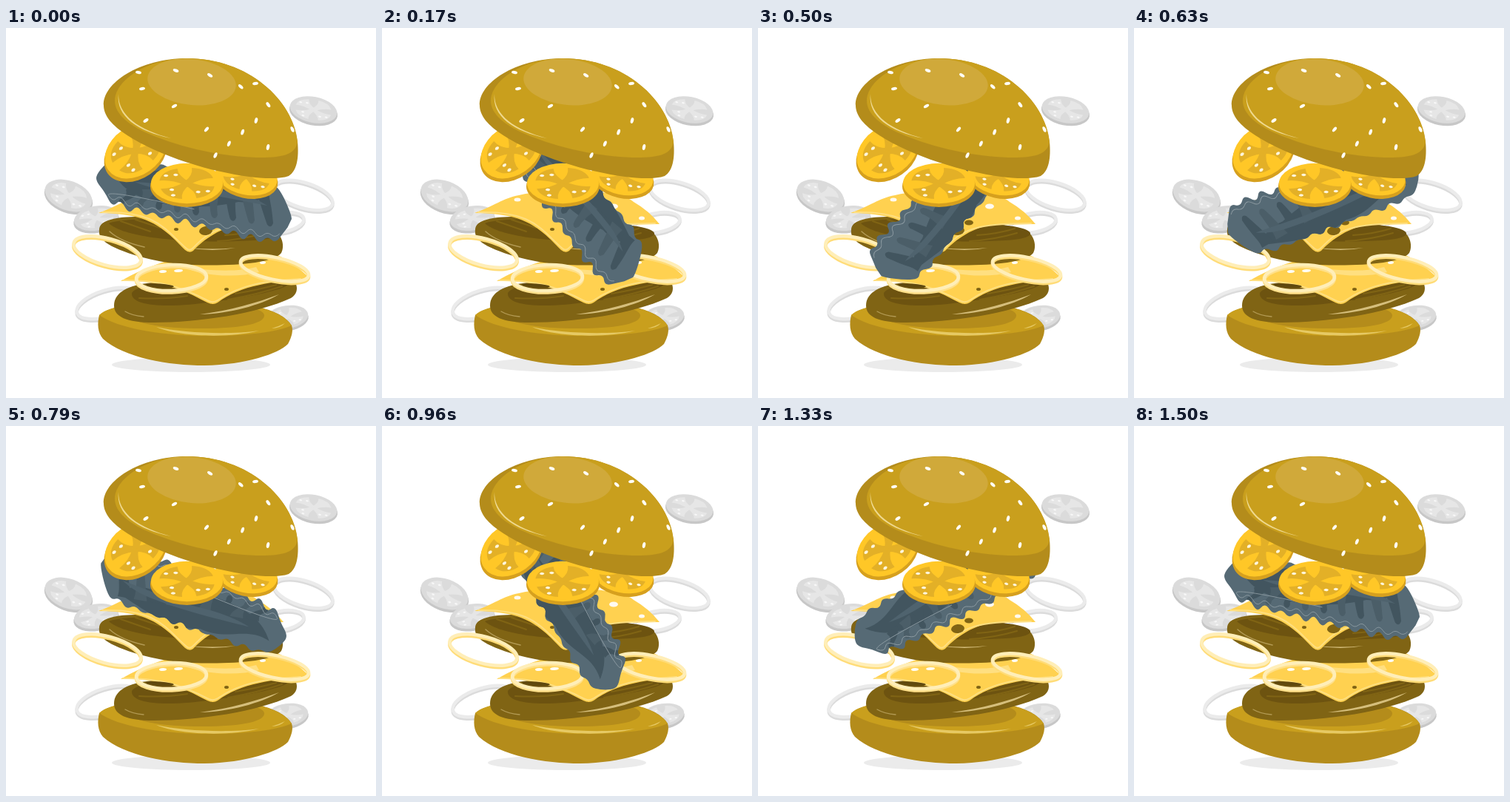
An HTML page with a canvas for the animation above (1.54 s loop, 500 by 500 pixels).

```html
<!DOCTYPE html>
<html lang="en">
<head>
<meta charset="utf-8">
<title>Burger</title>
<style>
  html, body { margin: 0; width: 100%; height: 100%; overflow: hidden; background: #fff; }
  canvas { display: block; width: 100vmin; height: 100vmin; }
</style>
</head>
<body>
<canvas id="stage" width="500" height="500"></canvas>
<script>
const ctx = document.getElementById('stage').getContext('2d');
const LOOP = 1540, STEPS = 37, STEP_ANGLE = 10;
const rad = deg => deg * Math.PI / 180;
const mix = (a, b, t) => a + (b - a) * t;

function fill(path, color) {
  ctx.fillStyle = color;
  ctx.fill(new Path2D(path));
}

function line(path, color, width) {
  ctx.strokeStyle = color;
  ctx.lineWidth = width;
  ctx.lineCap = ctx.lineJoin = 'round';
  ctx.stroke(new Path2D(path));
}

function oval(x, y, rx, ry, rot, color) {
  ctx.fillStyle = color;
  ctx.beginPath();
  ctx.ellipse(x, y, rx, ry, rad(rot), 0, 2 * Math.PI);
  ctx.fill();
}

function ring(x, y, rx, ry, rot, top, under) {
  ctx.lineWidth = 4.5;
  for (const [dy, color] of [[1.5, under], [-1, top]]) {
    ctx.strokeStyle = color;
    ctx.beginPath();
    ctx.ellipse(x, y + dy, rx, ry, rad(rot), 0, 2 * Math.PI);
    ctx.stroke();
  }
}

const GREY = { rim: '#c7c7c7', face: '#dbdbdb', cross: '#e6e6e6', seed: '#f7f7f7' };
const GOLD = { rim: '#d6a01e', face: '#ffc727', cross: '#e3b027', seed: '#fff6dc' };

function tomato(x, y, rx, ry, rot, skin, depth) {
  oval(x, y + depth / 2, rx, ry, rot, skin.rim);
  ctx.save();
  ctx.translate(x, y - depth / 2);
  ctx.rotate(rad(rot));
  ctx.scale(rx, ry);
  oval(0, 0, 0.98, 0.97, 0, skin.face);
  for (let i = 0; i < 4; i++) {
    ctx.save();
    ctx.rotate(rad(40 + i * 90));
    fill('M0-.1 Q.42-.12 .66-.38 Q.92 0 .66 .38 Q.42 .12 0 .1Z', skin.cross);
    oval(0.12, -0.5, 0.06, 0.06, 0, skin.seed);
    oval(-0.08, -0.68, 0.06, 0.06, 0, skin.seed);
    ctx.restore();
  }
  ctx.restore();
}

function background() {
  oval(250, 455, 107, 10, 0, '#ebebeb');
  tomato(415.5, 112, 33, 18, 11, GREY, 3);
  tomato(84.5, 228, 34, 20.5, 20, GREY, 3);
  tomato(122, 258.5, 31, 17, -10, GREY, 3);
  tomato(380, 392, 29, 16, -8, GREY, 3);
  ring(402, 227, 41, 17, 17, '#ebebeb', '#dbdbdb');
  ring(372, 264, 31, 13, -10, '#ebebeb', '#dbdbdb');
  ring(137, 373, 43, 18, -17, '#ebebeb', '#dbdbdb');
}

function bottomBun() {
  fill('M126 388 C123 400 124 412 131 420 C160 446 220 456 268 456 C325 455 368 440 381 427 C387 416 388 408 386 402 C375 385 345 370 260 370 C180 370 140 375 126 388Z', '#b48c1b');
  fill('M126 388 C140 374 190 368 260 368 C340 370 375 385 386 402 C366 411 320 417 265 416 C205 415 150 405 126 388Z', '#c99f1d');
  fill('M163 386 C168 401 225 407 275 406 C325 405 350 398 349 388 C347 380 330 374 270 374 C200 374 165 378 163 386Z', '#b48c1b');
  fill('M203 404 C238 412 300 415 342 409 C304 419 236 418 203 404Z', '#e6c964');
  fill('M359 406 Q369 403 377 399 Q370 406 359 406Z', '#e6c964');
}

function lowerPatty() {
  fill('M146 375 C146 360 160 349 190 345 C250 337 350 335 391 344 C395 352 393 360 385 365 C340 386 260 398 200 398 C162 398 146 390 146 375Z', '#806414');
  fill('M170 358 C180 342 260 338 378 346 C390 350 330 364 280 370 C225 378 168 378 170 358Z', '#6d5310');
  line('M180 365 Q215 367 245 362 M300 367 Q340 360 373 349 M310 359 Q340 354 365 347', '#806414', 2);
  fill('M262 387 C302 382 340 371 369 360 C343 375 302 386 262 387Z', '#d5be7b');
  line('M161 383 Q171 389 186 390', '#b29a54', 1.3);
}

function lowerCheese() {
  fill('M155 342 Q200 315 270 302 L365 306 C385 315 400 328 410 338 C360 343 318 347 286 371 Q280 375 272 371 C250 360 235 350 195 344 Q172 341 155 342Z', '#ffd150');
  line('M158 341 C205 340 238 350 274 369 Q280 372 286 368 C318 346 350 342 398 339', '#ffdf80', 2);
  fill('M235 321 C270 329 315 330 338 323 L342 330 C310 338 264 336 235 321Z', '#ffdf80');
  oval(208, 348, 19, 2.5, 4, '#5f480e');
  oval(298, 353, 3, 2, 0, '#806414');
  oval(212, 329, 5, 2, -3, '#fffdf4');
  oval(233, 328, 6, 2, -3, '#fffdf4');
  oval(347, 317, 4, 2, -3, '#fffdf4');
}

function upperPatty() {
  fill('M126 272 C127 259 150 255 180 255 C250 256 340 263 364 275 C375 282 376 297 372 304 C360 319 300 322 250 320 C200 318 152 302 135 290 C128 284 125 280 126 272Z', '#806414');
  fill('M139 264 C160 255 260 257 345 268 C380 274 374 285 335 287 C275 291 165 288 139 264Z', '#6d5310');
  line('M155 261 L195 275 M175 259 L208 270 M286 288 Q320 286 350 277 M296 280 Q325 278 347 271', '#806414', 2);
  line('M140 275 C151 285 169 292 187 296', '#b29a54', 1.5);
  fill('M246 297 Q280 300 310 297 Q280 303 246 297Z', '#d5be7b');
}

function upperCheese() {
  fill('M125 250 C151 241 163 230 185 226 C240 214 325 220 340 235 Q361 247 375 265 L315 266 C286 271 264 289 253 301 Q248 305 242 300 C226 284 207 261 170 254 Q149 250 125 250Z', '#ffd150');
  line('M130 249 C205 247 215 273 244 298 Q248 302 253 297 C277 272 293 264 369 264', '#ffdf80', 2);
  oval(183, 232, 4.5, 2.5, 0, '#fffaf0');
  oval(313, 241, 6, 3.5, 0, '#fffaf0');
  oval(351, 257, 4, 2.5, 0, '#fffaf0');
  oval(230, 272, 3, 2, 0, '#806414');
  oval(270, 274, 9, 6, -8, '#806414');
  oval(285, 263, 6, 3.5, 0, '#806414');
}

// Smooth curve through the middles of successive points.
function softPath(points) {
  return points.slice(1).reduce((d, [x, y], i) => {
    const [u, v] = points[i + 2] || points[0];
    return `${d}Q${x} ${y} ${(x + u) / 2} ${(y + v) / 2}`;
  }, `M${(points[0][0] + points[1][0]) / 2} ${(points[0][1] + points[1][1]) / 2}`);
}

// One long edge of the sloping leaf, with frills alternating in and out.
function leafEdge(side, frill, inset) {
  const count = 24;
  return Array.from({ length: count + 1 }, (_, i) => {
    const s = side * (1 - 2 * i / count), x = 132 * s;
    const half = (36 + 5 * s - inset) * Math.sqrt(1 - s ** 8);
    const wave = (i % 2 ? -1 : 1) * frill + 2 * Math.sin(i * 2.3);
    return [x, 0.2 * x - 4 + side * (half + wave)];
  });
}

const LEAF = softPath([...leafEdge(1, 7, 0), ...leafEdge(-1, 4, 0)]) + 'Z';
const FRILL = softPath(leafEdge(1, 6, 7).slice(1, -1));

function lettuce(angle) {
  ctx.save();
  ctx.translate(254, 233);
  ctx.rotate(rad(angle));
  fill(LEAF, '#566a75');
  ctx.save();
  ctx.clip(new Path2D(LEAF));
  fill('M-110 -39 C-75 -24 -55 -50 -15 -39 C20 -48 65 -27 101 -11 C95 0 75 4 60 2 C25 10 -15 11 -50 2 C-76 -4 -97 -14 -110 -39Z', '#42555f');
  for (let i = 0; i < 9; i++) {
    const x = -84 + i * 22, tip = x + (i - 4) * 3, low = x * 0.17 + 17;
    fill(`M${x - 8} -15 C${x - 4} 0 ${tip - 8} ${low - 8} ${tip - 5} ${low} Q${tip} ${low + 6} ${tip + 3} ${low - 2} C${tip + 1} 2 ${x + 8} -4 ${x + 10} -15Z`, i % 2 ? '#4b5e68' : '#42555f');
  }
  fill('M-80 -25 C-40 -22 10 -20 65 -8 Q84 -3 99 7 C65 1 25 -9 -14 -11 Q-54 -14 -80 -25Z', '#4f636e');
  line(FRILL, '#8d9ba2', 0.9);
  ctx.restore();
  ctx.restore();
}

// Seeds spread evenly along a bent row, turning on the way.
function seedRow([x0, y0, turn0], [x1, y1, turn1], bendX, bendY, count) {
  for (let i = 0; i < count; i++) {
    const t = i / (count - 1), bend = 4 * t * (1 - t);
    oval(mix(x0, x1, t) + bendX * bend, mix(y0, y1, t) + bendY * bend, 4, 2.1, mix(turn0, turn1, t), '#fffdf5');
  }
}

function topBun() {
  fill('M132 105 C130 75 180 41 245 41 C327 41 388 97 394 154 C396 176 393 193 382 200 C365 206 330 203 290 194 C230 181 162 152 140 125 C134 117 132 110 132 105Z', '#b48c1b');
  fill('M147 98 C147 74 184 42 245 41 C327 41 388 97 394 154 C391 170 376 175 345 175 C305 175 250 166 200 146 C165 132 147 116 147 98Z', '#c99f1d');
  oval(251, 73, 60, 31, 6, '#d0a93a');
  fill('M152 89 C151 118 180 138 223 149 C178 140 148 119 152 89Z', '#efd98f');
  seedRow([179, 60, 10], [387, 137, 65], 14, -28, 6);
  seedRow([184, 82, -10], [271, 137, -50], 0, -4, 3);
  seedRow([338, 125, -75], [283, 172, -65], 0, 0, 4);
  seedRow([337, 75, -8], [354, 161, -78], 0, 0, 2);
  oval(189, 125, 4, 2.1, -35, '#fffdf5');
}

function draw(now) {
  const step = Math.floor((now % LOOP + 6) / (LOOP / STEPS)) % STEPS;
  ctx.fillStyle = '#fff';
  ctx.fillRect(0, 0, 500, 500);
  background();
  bottomBun();
  lowerPatty();
  lowerCheese();
  upperPatty();
  upperCheese();
  ring(137, 303.5, 47, 18, 15, '#ffeeb8', '#ffdc78');
  ring(223.5, 338.5, 47.5, 17.5, -2, '#ffeeb8', '#ffe08a');
  ring(363, 326, 47, 15, 12, '#ffeeb8', '#ffdc78');
  lettuce(step * STEP_ANGLE);
  tomato(325, 202, 43, 26, 12, GOLD, 4);
  tomato(175, 168, 46, 34, -35, GOLD, 4);
  tomato(244.5, 212, 49.5, 28, 0, GOLD, 4);
  topBun();
}

const start = performance.now();
function tick() {
  draw(performance.now() - start);
  requestAnimationFrame(tick);
}
tick();
</script>
</body>
</html>
```
